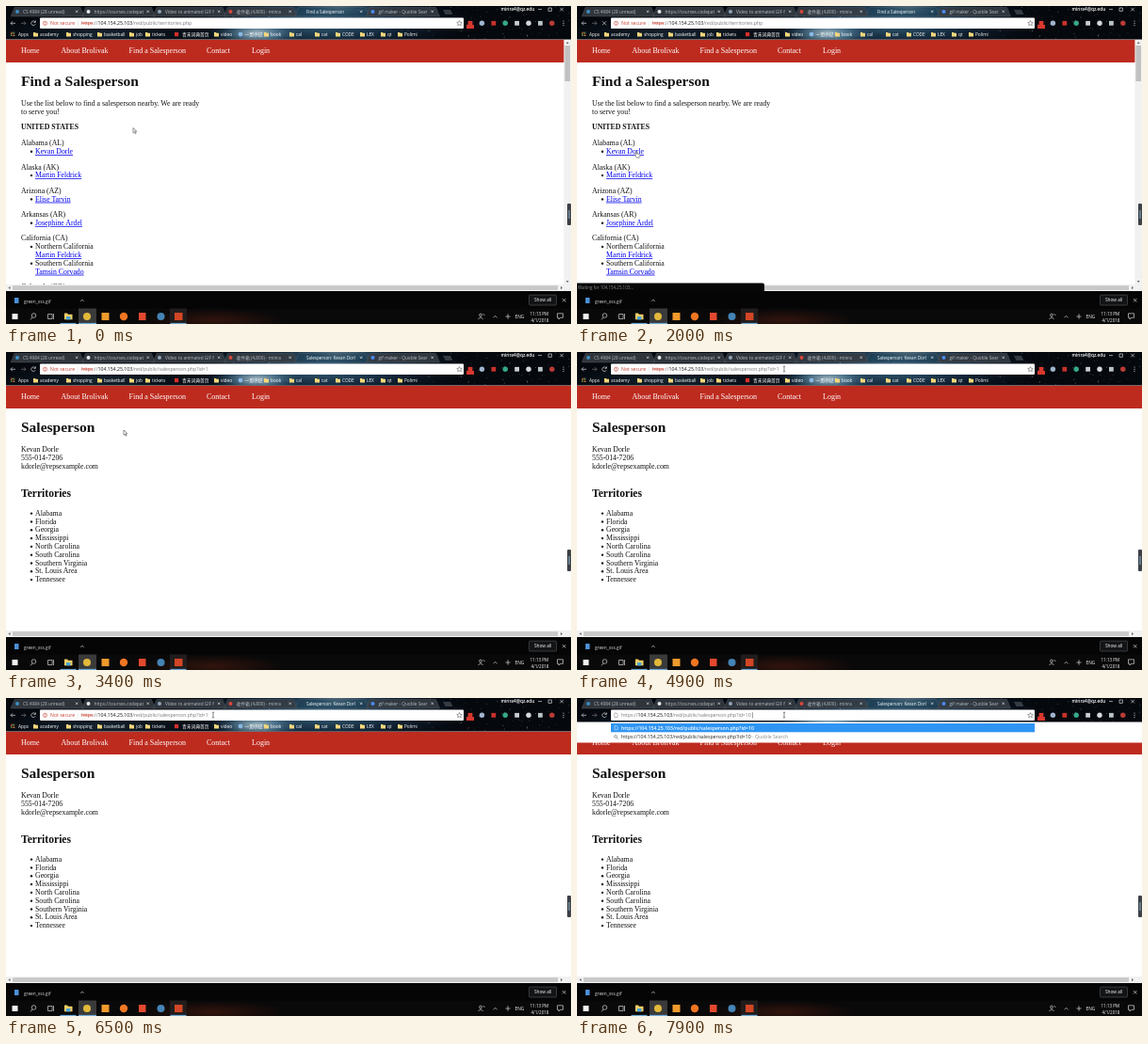
An HTML page for the animation above (8 s loop, 600 px wide and 338 px high).

```html
<!DOCTYPE html>
<html lang="en">
<head>
<meta charset="utf-8">
<title>Browser session</title>
<style>
html, body { margin: 0; width: 100%; height: 100%; overflow: hidden; background: #fff; }
svg { display: block; width: 100vw; height: 100vh; }
text { font-family: "Open Sans", "Noto Sans CJK SC", "Noto Sans CJK", sans-serif; font-size: 4.75px; fill: #d4d7da; white-space: pre; }
.page text { font-family: "Liberation Serif", "Times New Roman", serif; font-size: 7.8px; fill: #111; }
.page .h1 { font-size: 15.5px; font-weight: bold; }
.page .h2 { font-size: 11.6px; font-weight: bold; }
.page .strong { font-weight: bold; }
.page .link { fill: #00e; text-decoration: underline; }
.page .nav { font-size: 8px; fill: #fff; }
.url, .url text { font-size: 5.16px; fill: #777; }
.url .host { fill: #111; }
.url .bad { fill: #c5392b; }
.url .strike { text-decoration: line-through; }
.status text { font-size: 4.45px; fill: #8a8d90; }
.tab { fill: #b9bec4; }
.active { font-size: 4.6px; fill: #fff; }
.bright { fill: #fff; }
.clock { font-size: 4.55px; fill: #fff; }
.line { fill: none; stroke: #d4d7da; stroke-width: .7; }
.dim { stroke: #777; }

/* 1% = 80 ms */
.t { animation: 8s step-end infinite; }
.old { animation-name: old; }
.fresh { animation-name: fresh; }
.typed { animation-name: typed; }
.visited { animation-name: visited; }
.list { animation-name: list; }
.person { animation-name: person; }
.hover { animation-name: hover; }
.wait { animation-name: wait; }
.idle { animation-name: idle; }
.hand { animation-name: hand; }
.arrow { animation-name: arrow; }
.beam { animation-name: beam; }
.caret { animation-name: caret; }
@keyframes old { 0% { opacity: 1 } 32.5%, 100% { opacity: 0 } }
@keyframes fresh { 0% { opacity: 0 } 32.5%, 100% { opacity: 1 } }
@keyframes visited { 0% { opacity: 0 } 32.5% { opacity: 1 } 93.75%, 100% { opacity: 0 } }
@keyframes typed { 0% { opacity: 0 } 93.75%, 100% { opacity: 1 } }
@keyframes list { 0% { opacity: 1 } 36.25%, 100% { opacity: 0 } }
@keyframes person { 0% { opacity: 0 } 36.25%, 100% { opacity: 1 } }
@keyframes hover { 0% { opacity: 0 } 13% { opacity: 1 } 25%, 100% { opacity: 0 } }
@keyframes wait { 0% { opacity: 0 } 25% { opacity: 1 } 36.25%, 100% { opacity: 0 } }
@keyframes idle { 0% { opacity: 1 } 25% { opacity: 0 } 36.25%, 100% { opacity: 1 } }
@keyframes hand { 0% { opacity: 0 } 13% { opacity: 1 } 36.25%, 100% { opacity: 0 } }
@keyframes arrow { 0% { opacity: 1 } 13% { opacity: 0 } 36.25% { opacity: 1 } 53%, 100% { opacity: 0 } }
@keyframes beam { 0% { opacity: 0 } 53%, 100% { opacity: 1 } }
@keyframes caret { 0% { opacity: 0 } 87.5% { opacity: 1 } 93.75%, 100% { opacity: 0 } }
#pointer { animation: move 8s ease-in-out infinite; }
@keyframes move {
  0%, 4% { transform: translate(135px, 129.5px) }
  13%, 37% { transform: translate(62.5px, 154px) }
  42%, 45.5% { transform: translate(125px, 83px) }
  54%, 100% { transform: translate(220px, 18px) }
}
</style>
</head>
<body>
<svg viewBox="0 0 600 338" preserveAspectRatio="none">
  <defs>
    <radialGradient id="nebula">
      <stop offset="0" stop-color="#4d86a6" stop-opacity=".75"/>
      <stop offset=".5" stop-color="#1c3c58" stop-opacity=".6"/>
      <stop offset="1" stop-color="#081220" stop-opacity="0"/>
    </radialGradient>
    <radialGradient id="glow">
      <stop offset="0" stop-color="#d9eef5" stop-opacity=".75"/>
      <stop offset=".45" stop-color="#6fa3bf" stop-opacity=".5"/>
      <stop offset="1" stop-color="#1c3c58" stop-opacity="0"/>
    </radialGradient>
    <radialGradient id="ember">
      <stop offset="0" stop-color="#32140d"/>
      <stop offset="1" stop-color="#32140d" stop-opacity="0"/>
    </radialGradient>
    <clipPath id="view"><rect y="35.5" width="600" height="260.5"/></clipPath>
    <clipPath id="top"><rect width="600" height="35.5"/></clipPath>
  </defs>
  <rect width="600" height="338" fill="#fff"/>

  <g class="page" clip-path="url(#view)">
    <rect y="35.5" width="600" height="24.5" fill="#bd2b1f"/>
    <g id="nav"></g>
    <g class="t list" id="list"></g>
    <g class="t person" id="person"></g>
  </g>

  <g class="t list">
    <rect x="592.4" y="35.5" width="7.6" height="261" fill="#f1f1f1"/>
    <rect x="593.4" y="42" width="5.6" height="38" fill="#c1c1c1"/>
    <path d="M594.7 40l1.5-2 1.5 2zM594.7 292l1.5 2 1.5-2z" fill="#666"/>
  </g>
  <rect x="596" y="210" width="4" height="23" rx="1" fill="#3d4248"/>
  <path d="M598 217v9" stroke="#8fb3c9"/>
  <rect y="296" width="600" height="7" fill="#f1f1f1"/>
  <rect x="7" y="297.2" width="579" height="4.7" fill="#c8c8c8"/>
  <path d="M4.5 298l-2 1.6 2 1.6zM589 298l2 1.6-2 1.6z" fill="#666"/>

  <g class="status">
    <g class="t hover">
      <path d="M0 294.6h197q2 0 2 2v6.8h-199z" fill="#060708"/>
      <text x="1" y="301">https://104.154.25.103/red/public/salesperson.php?id=1</text>
    </g>
    <g class="t wait">
      <path d="M0 294.6h197q2 0 2 2v6.8h-199z" fill="#060708"/>
      <text x="1" y="301">Waiting for 104.154.25.103...</text>
    </g>
  </g>

  <g clip-path="url(#top)">
    <rect width="600" height="36" fill="#05080d"/>
    <ellipse cx="335" cy="16" rx="165" ry="42" fill="url(#nebula)"/>
    <ellipse cx="100" cy="30" rx="140" ry="22" fill="url(#nebula)" opacity=".3"/>
    <ellipse cx="266" cy="29" rx="52" ry="17" fill="url(#glow)"/>
    <ellipse cx="352" cy="3" rx="60" ry="12" fill="url(#glow)" opacity=".5"/>
    <g id="stars" fill="#dbeaf5"></g>
  </g>
  <g id="tabs"></g>
  <text x="319" y="7.8" class="active t old">Find a Salesperson</text>
  <text x="319" y="7.8" class="active t fresh">Salesperson: Kevan Dorl</text>
  <text x="525.5" y="4.9" class="bright" font-weight="600">minra4@qz.edu</text>
  <path class="line" d="M565 3.6h4M576 2h3.4v3.4h-3.4zM588.3 1.8l3.6 3.6m0-3.6l-3.6 3.6"/>

  <path class="line" d="M10 18.3h-5m2-2l-2 2 2 2"/>
  <path class="line dim" d="M16 18.3h5m-2-2l2 2-2 2"/>
  <path class="line t idle" d="M31 17a2.3 2.3 0 1 0 .2 2.2M31.4 15.4v2h-2"/>
  <path class="line t wait" d="M27 16.3l4 4m0-4l-4 4"/>
  <rect x="36" y="12.5" width="450" height="11.5" rx="1" fill="#fff"/>
  <path class="line dim" d="M481.5 15.5l.8 1.8 2 .2-1.5 1.3.5 2-1.8-1-1.8 1 .5-2-1.5-1.3 2-.2z"/>
  <!-- The address flips at commit, slightly before the page is painted -->
  <g class="url">
    <g class="t old" id="urlList"></g>
    <g class="t visited" id="urlPerson"></g>
    <g class="t typed" id="urlTyped"></g>
  </g>
  <rect class="t caret" x="216" y="15.2" width=".5" height="6.2" fill="#111"/>
  <g id="tools"></g>
  <g id="marks"></g>

  <g class="t typed">
    <rect y="25.5" width="600" height="22" fill="#fff"/>
    <rect x="36" y="27" width="450" height="9.3" fill="#2f95f3"/>
    <path d="M40 29.7h2.2l1 1v3h-3.2z" fill="none" stroke="#fff" stroke-width=".5"/>
    <text x="47" y="33.5" class="bright" style="font-size:5.15px;font-weight:600">https://104.154.25.103/red/public/salesperson.php?id=10</text>
    <path d="M42 42l1.6 1.6" stroke="#666" stroke-width=".6"/>
    <circle cx="41" cy="40.9" r="1.4" fill="none" stroke="#666" stroke-width=".6"/>
    <text x="47" y="43.2" style="font-size:5.16px;fill:#222">https://104.154.25.103/red/public/salesperson.php?id=10<tspan fill="#888"> - Quoble Search</tspan></text>
  </g>

  <rect y="303" width="600" height="35" fill="#050505"/>
  <rect x="9" y="310" width="4.5" height="6" fill="#4d90d8"/>
  <text x="19" y="315.6">green_xss.gif</text>
  <path class="line" d="M79.3 313.8l1.7-1.7 1.7 1.7"/>
  <rect x="555.5" y="307.2" width="29" height="10.8" rx="1" fill="#121416" stroke="#55595d" stroke-width=".6"/>
  <text x="561" y="314.4" class="bright">Show all</text>
  <path class="line" d="M591 311l3.4 3.4m0-3.4l-3.4 3.4"/>

  <rect y="321.5" width="600" height="16.5" fill="#0a0909"/>
  <ellipse cx="220" cy="334" rx="75" ry="12" fill="url(#ember)"/>
  <rect x="77" y="321.5" width="19" height="16.5" fill="#3a3a3b"/>
  <rect x="174" y="321.5" width="18" height="16.5" fill="#221d1c"/>
  <path d="M77 337.4h19M174.5 337.4h17M57.5 337.4h17" stroke="#76b9ed"/>
  <rect x="6.5" y="327" width="6" height="6" fill="#f2f2f2"/>
  <circle class="line" cx="29.5" cy="329" r="2.3"/>
  <path class="line" d="M28 331l-2 2.4M44.5 327.5h4.6v5h-4.6zM50.5 327v6"/>
  <path d="M62 326.5h3l1 1.2h4.5v5.6h-8.5z" fill="#f3cd66"/>
  <rect x="64" y="330" width="4.5" height="3.3" fill="#4ba5d6"/>
  <g id="dock"></g>
  <g class="line">
    <circle cx="504" cy="328.5" r="1.4"/>
    <path d="M501.5 333q2.5-4 5 0M506.5 327.5l2 1M517.5 331.3l2-2 2 2M530.5 330h5m-2.5-2.7v5.4"/>
    <path d="M585.5 326.8h6v4.5h-3l-1.5 1.7v-1.7h-1.5z"/>
  </g>
  <text x="540.5" y="331.9" class="bright">ENG</text>
  <text x="556.5" y="328.9" class="clock">11:13 PM</text>
  <text x="557.5" y="336.3" class="clock">4/1/2018</text>

  <g id="pointer">
    <path class="t arrow" d="M0 0v5.3l1.3-1.1.9 2 .9-.4-.9-1.9h1.7z" fill="#fff" stroke="#222" stroke-width=".5"/>
    <path class="t hand" d="M0 .6q.6-.8 1.2 0v2.3l2.6.6q.7.3.5 1.2l-.6 2.5h-2.9l-2-2.6q-.2-.9.6-.7l.6.6z" fill="#fff" stroke="#222" stroke-width=".5"/>
    <path class="t beam" d="M-1.2-3q1.2 0 1.2.7 0-.7 1.2-.7M0-2.3v4.6M-1.2 3q1.2 0 1.2-.7 0 .7 1.2.7" fill="none" stroke="#222" stroke-width=".55"/>
  </g>
</svg>
<script>
const fill = (id, parts) => document.getElementById(id).innerHTML = parts.flat(Infinity).join('');
const label = (x, y, s, cls = '') => `<text x="${x}" y="${y}" class="${cls}">${s}</text>`;
const dot = (x, y, r, c) => `<circle cx="${x}" cy="${y}" r="${r}" fill="${c}"/>`;
const box = (x, y, w, h, c) => `<rect x="${x}" y="${y}" width="${w}" height="${h}" fill="${c}"/>`;
const ROW = 8.81;
const bullet = y => dot(27, y - 2.2, 1.2, '#111');

fill('nav', [[16, 'Home'], [58.5, 'About Brolivak'], [130.5, 'Find a Salesperson'], [213, 'Contact'], [261, 'Login']]
  .map(([x, s]) => label(x, 50.3, s, 'nav')));

const states = [['Alabama (AL)', 'Kevan Dorle'], ['Alaska (AK)', 'Martin Feldrick'],
  ['Arizona (AZ)', 'Elise Tarvin'], ['Arkansas (AR)', 'Josephine Ardel']];
const regions = [['Northern California', 'Martin Feldrick'], ['Southern California', 'Tamsin Corvado']];
const calY = 249.4;
fill('list', [
  label(16, 84.6, 'Find a Salesperson', 'h1'),
  label(16, 106.2, 'Use the list below to find a salesperson nearby. We are ready'),
  label(16, 115, 'to serve you!'),
  label(16, 131.2, 'UNITED STATES', 'strong'),
  states.map(([state, name], i) => {
    const y = 148.2 + i * 25.3;
    return [label(16, y, state), bullet(y + ROW), label(31, y + ROW, name, 'link')];
  }),
  label(16, calY, 'California (CA)'),
  regions.map(([region, name], i) => {
    const y = calY + ROW * (1 + 2 * i);
    return [bullet(y), label(31, y, region), label(31, y + ROW, name, 'link')];
  }),
  label(16, 300.6, 'Colorado (CO)')
]);

const areas = ['Alabama', 'Florida', 'Georgia', 'Mississippi', 'North Carolina',
  'South Carolina', 'Southern Virginia', 'St. Louis Area', 'Tennessee'];
fill('person', [
  label(16, 84.6, 'Salesperson', 'h1'),
  ['Kevan Dorle', '555-014-7206', 'kdorle@repsexample.com'].map((s, i) => label(16, 106.2 + i * ROW, s)),
  label(16, 154.4, 'Territories', 'h2'),
  areas.map((s, i) => [bullet(173.8 + i * ROW), label(31, 173.8 + i * ROW, s)])
]);

// Theme stars from a small seeded generator
let seed = 7;
const rnd = () => (seed = seed * 16807 % 2147483647) / 2147483647;
fill('stars', Array.from({ length: 180 }, () =>
  `<circle cx="${200 + rnd() * 400}" cy="${rnd() * 36}" r="${.15 + rnd() * .35}" opacity="${.2 + rnd() * .6}"/>`));

const tabs = [['CS 4984 (28 unread)', '#3b8ec2'], ['https://courses.codepat', '#e8e8e8'],
  ['Video to animated GIF f', '#8fa3b8'], ['收件箱 (4,800) - minra', '#d9473a'],
  ['', '#e8e8e8'], ['gif maker - Quoble Sear', '#4c8bf5']];
fill('tabs', [
  tabs.map(([title, color], i) => {
    const x = 5 + i * 75.5, on = i === 4;
    const skin = on ? 'fill="#16394f" fill-opacity=".45"' : 'fill="#383e45" fill-opacity=".85"';
    return [
      `<path d="M${x} 11l4-9.5h70l4 9.5z" ${skin} stroke="#555e67" stroke-width=".4"/>`,
      on ? '' : dot(x + 7, 6, 2, color),
      label(x + 13, 7.8, title, 'tab'),
      `<path class="line" d="M${x + 69} 4.6l2.4 2.4m0-2.4l-2.4 2.4"/>`
    ];
  }),
  '<path d="M464 4h8l2.5 5h-8z" fill="#343b43"/>'
]);

const address = (x, file, scheme) =>
  `<text x="${x}" y="20.1">${scheme}://<tspan class="host">104.154.25.103</tspan>/red/public/${file}</text>`;
const struck = '<tspan class="bad strike">https</tspan>';
const warning = [
  '<circle cx="41.5" cy="18.3" r="2.1" fill="none" stroke="#c5392b" stroke-width=".6"/>',
  '<path d="M41.5 17v1.5m0 .5v.6" stroke="#c5392b" stroke-width=".6"/>',
  label(47, 20.1, 'Not secure', 'bad'), box(76.2, 15.5, .4, 5.6, '#ccc')
];
fill('urlList', [warning, address(80, 'territories.php', struck)]);
fill('urlPerson', [warning, address(80, 'salesperson.php?id=1', struck)]);
fill('urlTyped', [
  '<path d="M39.8 16h2.3l1 1v3.5h-3.3z" fill="none" stroke="#777" stroke-width=".5"/>',
  address(47, 'salesperson.php?id=10', 'https'), box(186.5, 15.2, .4, 6.2, '#111')
]);

const tools = ['#d8382f', '#9fb4cc', '#c8322c', '#35a88a', '#c9ced3', '#d5d9dd', '#b9c3ca', '#b93b35'];
fill('tools', [
  tools.map((c, i) => i % 2 ? dot(493 + i * 12.4, 18.3, 2.7, c) : box(490.6 + i * 12.4, 15.9, 4.8, 4.8, c)),
  [16, 18.3, 20.6].map(y => dot(592, y, .6, '#d4d7da')),
  box(489, 20, 8, 4, '#d8382f')
]);

const folders = [[36, 'academy'], [71, 'shopping'], [104, 'basketball'], [138, 'job'], [155, 'tickets'],
  [228, 'video'], [281, 'book'], [308, 'cal'], [335, 'cat'], [357, 'CODE'], [383, 'LEX'], [405, 'qt'], [423, 'Polimi']];
fill('marks', [
  [0, 1, 2].map(i => [0, 1, 2].map(j => box(5 + i * 1.6, 27.7 + j * 1.6, 1.1, 1.1, ['#d9544a', '#e6b840', '#58a65c'][(i + j) % 3]))),
  label(13, 31.9, 'Apps', 'bright'),
  folders.map(([x, s]) => [`<path d="M${x - 7} 28h2l.6.7h2.4v3.7h-5z" fill="#f4d77c"/>`, label(x, 31.9, s, 'bright')]),
  box(179, 28, 4.2, 4.2, '#d3302a'), label(187, 31.9, '青禾词典首页', 'bright'),
  dot(249, 30.1, 2.4, '#8ab9e6'), label(253.5, 31.9, '一页小记', 'bright')
]);

fill('dock', [
  dot(86, 330, 4, '#e2b93b'),
  box(101.5, 326, 8, 8, '#f09a2c'),
  dot(125, 330, 4.2, '#ef7622'),
  box(141, 326, 7.5, 8, '#e2492f'),
  dot(164.5, 330, 4, '#4584b6'),
  box(179, 326, 8.5, 8, '#d24625')
]);
</script>
</body>
</html>
```
